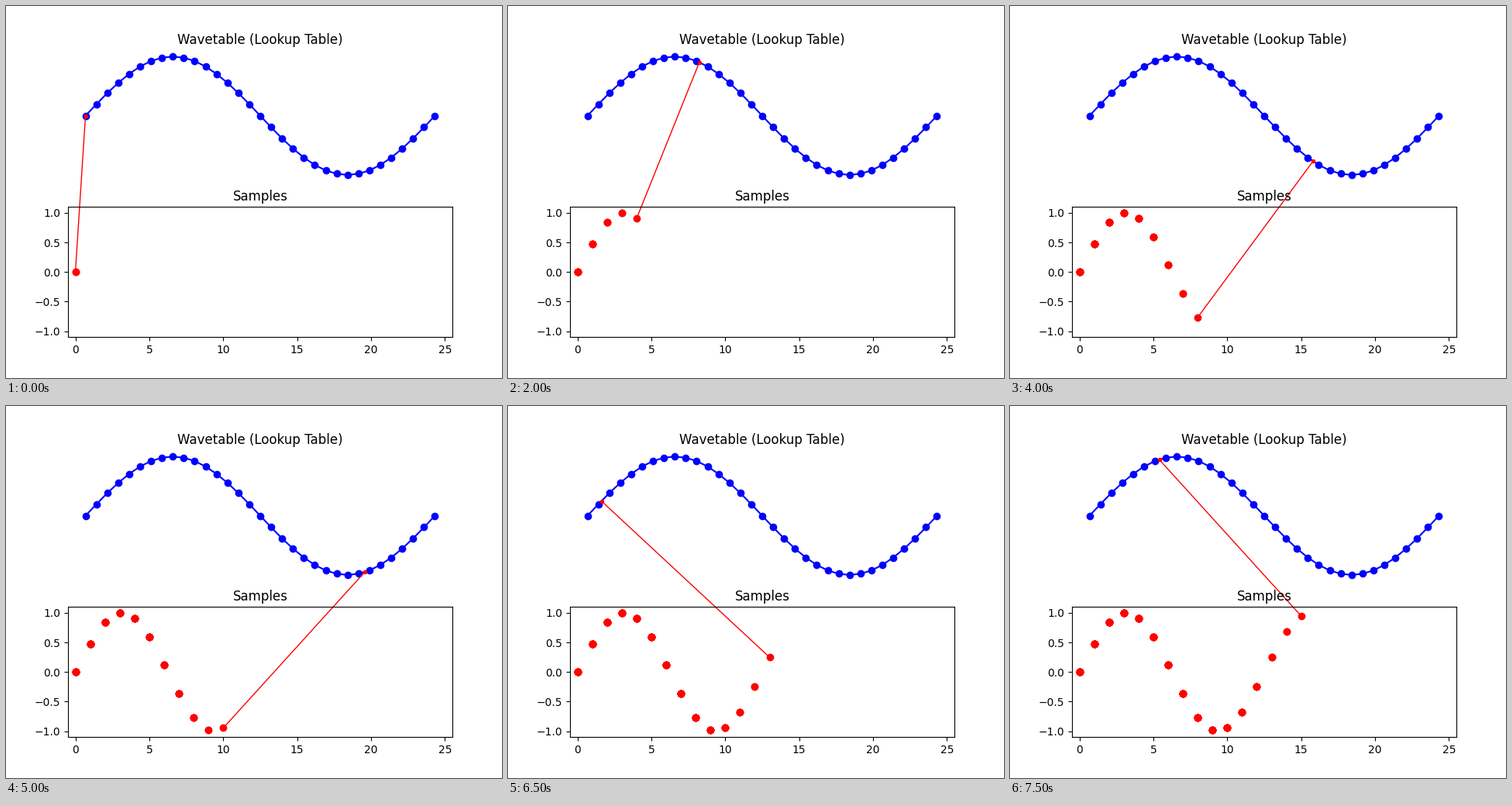
Write a matplotlib script that moves like this. It is 640 px wide and 480 px high and loops after 8 s.

```python
import numpy as np
import matplotlib.pyplot as plt
from matplotlib.animation import FuncAnimation
from matplotlib.patches import ConnectionPatch

SIZE = 32           # table steps per cycle
STEP = 2.56         # table steps per sample
FRAMES = 16
INTERVAL = 500

index = np.arange(SIZE + 1)
table = np.sin(2 * np.pi * index / SIZE)

phases = (np.arange(FRAMES) * STEP) % SIZE
samples = np.interp(phases, index, table)

fig, (top, bottom) = plt.subplots(2, 1, figsize=(6.4, 4.8), dpi=100)

top.set_title("Wavetable (Lookup Table)")
top.plot(index, table, "bo-")
top.axis("off")
reader, = top.plot([0], [0], "r.")

bottom.set_title("Samples")
bottom.set_xlim(-0.5, 25.5)
bottom.set_ylim(-1.1, 1.1)
dots, = bottom.plot([], [], "ro")

link = ConnectionPatch((0, 0), (0, 0), "data", "data",
                       axesA=top, axesB=bottom, color="red")
bottom.add_artist(link)


def update(n):
    phase, value = phases[n], samples[n]
    reader.set_data([phase], [value])

    # Each step stamps every dot once more, which hardens its edge.
    layers = n + 1 - np.arange(n + 1)
    layers[0] += 1
    dots.set_data(np.repeat(np.arange(n + 1), layers),
                  np.repeat(samples[:n + 1], layers))

    link.xy1 = (phase, value)
    link.xy2 = (n, value)
    return reader, dots, link


anim = FuncAnimation(fig, update, frames=FRAMES, interval=INTERVAL,
                     repeat=True, repeat_delay=0, blit=False)
plt.show()
```
